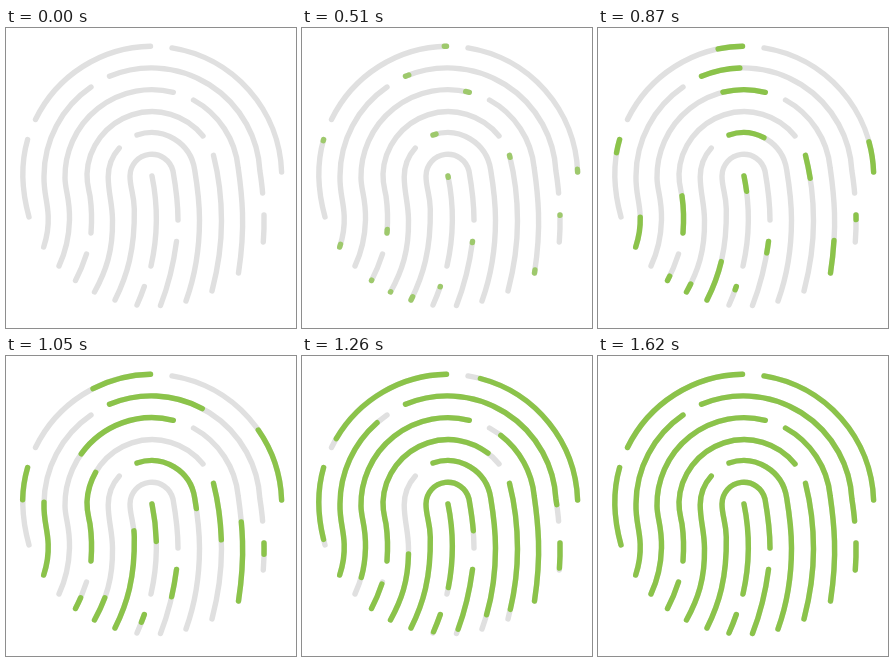
Recreate the animation shown at these times as an HTML page. Size 290 by 300 pixels, loop 2370 ms.

```html
<!DOCTYPE html>
<html lang="en">
<head>
<meta charset="utf-8">
<title>Fingerprint scan</title>
<style>
  html, body { margin: 0; width: 100%; height: 100%; overflow: hidden; background: #fff; }
  svg { display: block; width: 290px; height: 300px; }
  path { fill: none; stroke-width: 5.4; stroke-linecap: round; }
  .base { stroke: #e0e0e0; }
  .fill { stroke: #8bc34a; stroke-dasharray: 1 2; }
</style>
</head>
<body>
<svg viewBox="0 0 290 300"></svg>
<script>
const LOOP = 2370, START = 325, DRAW = 1085, LATE = 190;
const EASE = 'cubic-bezier(.91, 0, .63, 1)';

// Each ridge runs in the direction in which it fills.
const ridges = [
  'M144.5 18.2A130.3 130.3 0 0 0 29.5 91.5',
  'M275.6 144A130.3 130.3 0 0 0 166 19.9',
  'M21.6 111.5C14.5 136 15 160 23 189',
  'M103.5 48.3A108.7 108.7 0 0 1 253.9 143C255 150 256 157 256.6 165',
  'M37.7 219C41 209 42.7 200 42.2 188C41.5 172 37.6 165 38 148A108 108 0 0 1 85 59',
  'M258 187C258.2 196 258 205 257.3 214',
  'M167.3 64.3A86.9 86.9 0 0 0 59 150C59.2 163 64 170 63.5 192C63 210 60 223 53 238',
  'M232.5 245C236 222 237 200 236.5 185C236 170 234.5 156 232.2 140A87 87 0 0 0 187.5 72',
  'M85 205C86 192 86 182 84 168C82.5 160 80.8 156 81 146A65.2 65.2 0 0 1 197 108',
  'M207.5 127.3C212.5 147 215.5 170 215.5 193C215.5 218 212 240 206 263',
  'M131 107A43.7 43.7 0 0 1 188.7 142C192 162 193.5 175 193.5 192C193.5 222 189 248 180 273',
  'M109 272C121 248 129 222 128.3 181C128 166 124 160 124 148A21.8 21.8 0 0 1 167 143C170 160 172 175 172 192',
  'M146 148C151.5 175 152.5 205 145 238',
  'M170.5 213.5Q166 248 154.5 277.5',
  'M138.3 258.5Q135 268 131 277',
  'M69.5 252.5Q76 240 80.5 226'
];
const lateRidge = 'M88.5 264C100 243 107 223 106.5 192C106.3 175 102.3 165 102.2 149A43.5 43.5 0 0 1 113.3 120';

const svg = document.querySelector('svg');

function addPath(d, cls) {
  const p = document.createElementNS('http://www.w3.org/2000/svg', 'path');
  p.setAttribute('d', d);
  p.setAttribute('class', cls);
  p.setAttribute('pathLength', 1);
  svg.append(p);
  return p;
}

function addFill(d, delay) {
  const p = addPath(d, 'fill');
  const at = ms => ms / LOOP;
  const timing = { duration: LOOP, iterations: Infinity };
  const from = START + delay;
  p.animate([
    { strokeDashoffset: 0.998, offset: 0 },
    { strokeDashoffset: 0.998, offset: at(from), easing: EASE },
    { strokeDashoffset: 0, offset: at(from + DRAW) },
    { strokeDashoffset: 0, offset: 1 }
  ], timing);
  p.animate([
    { opacity: 0, offset: 0 },
    { opacity: 0, offset: at(315) },
    { opacity: 1, offset: at(570) },
    { opacity: 1, offset: 1 }
  ], timing);
}

[...ridges, lateRidge].forEach(d => addPath(d, 'base'));
ridges.forEach(d => addFill(d, 0));
addFill(lateRidge, LATE);

// One shared clock keeps every ridge in step.
const anims = document.getAnimations();
anims.forEach(a => { a.startTime = document.timeline.currentTime; });
</script>
</body>
</html>
```
